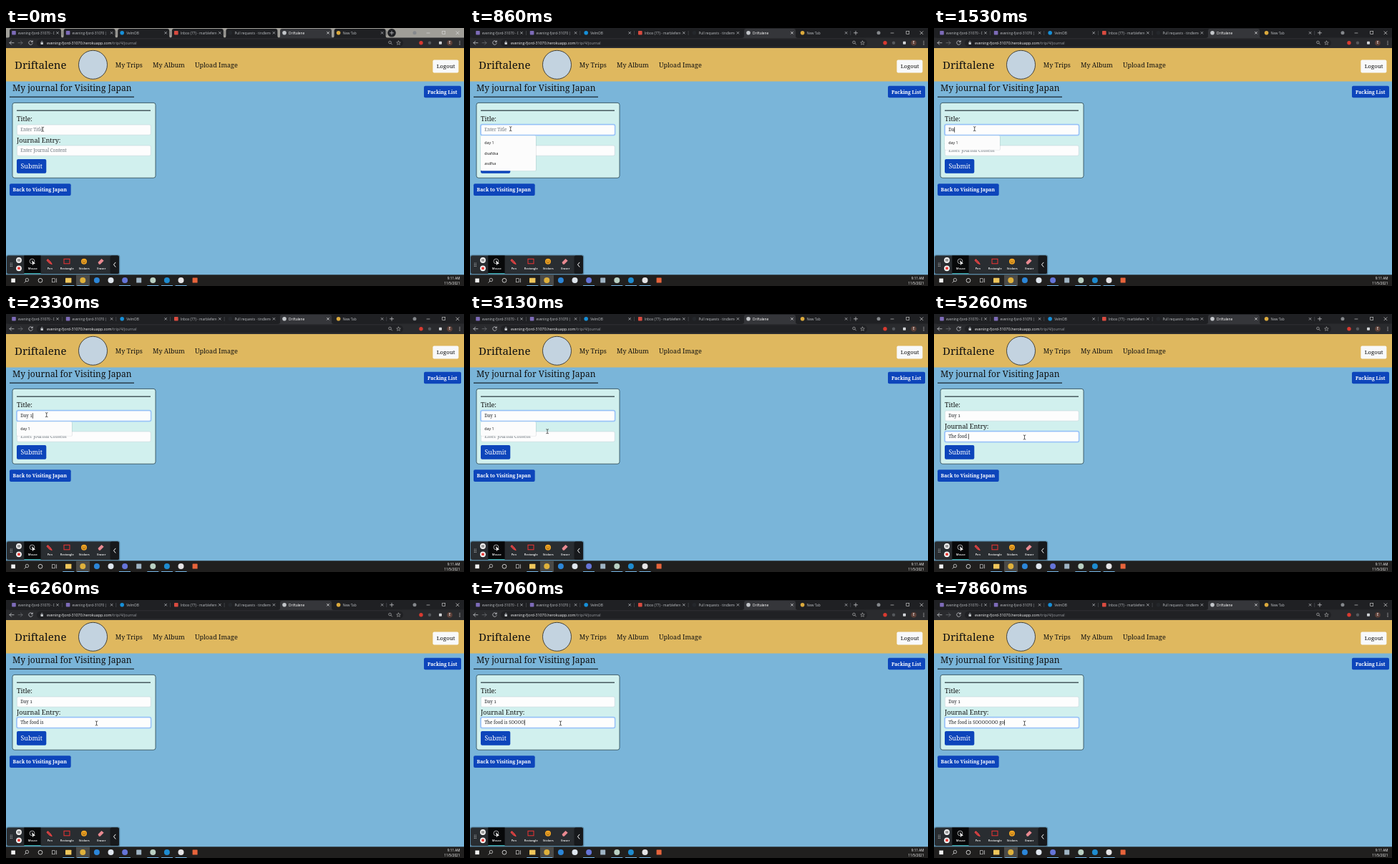
An HTML page that plays this animation: 640x360 px, repeating every 8 s.

```html
<!DOCTYPE html>
<html lang="en">
<head>
<meta charset="utf-8">
<title>Travel journal</title>
<style>
  html, body { margin: 0; width: 100%; height: 100%; overflow: hidden; background: #7ab5d9; }
  svg { display: block; width: 100vw; height: 100vh; }
  text { white-space: pre; }
  .serif { font-family: "Noto Serif", serif; font-variant-numeric: oldstyle-nums; }
  .ui { font-family: "Open Sans", "Noto Sans", sans-serif; }
  .line { fill: none; stroke-linecap: round; stroke-linejoin: round; }
</style>
</head>
<body>
<svg id="stage" viewBox="0 0 640 360"></svg>
<script>
const stage = document.getElementById('stage');
const rect = (x, y, w, h, fill, r = 0, more = '') =>
  `<rect x="${x}" y="${y}" width="${w}" height="${h}" rx="${r}" fill="${fill}" ${more}/>`;
const dot = (x, y, r, fill, more = '') => `<circle cx="${x}" cy="${y}" r="${r}" fill="${fill}" ${more}/>`;
const line = (d, color, width = 0.7, more = '') =>
  `<path class="line" d="${d}" stroke="${color}" stroke-width="${width}" ${more}/>`;
const text = (cls, x, y, size, str, fill = '#111', more = '') =>
  `<text class="${cls}" x="${x}" y="${y}" font-size="${size}" fill="${fill}" ${more}>${str}</text>`;
const serif = (...args) => text('serif', ...args);
const ui = (...args) => text('ui', ...args);
const cross = (x, y, s, color) => line(`M${x - s} ${y - s}l${2 * s} ${2 * s}m0 ${-2 * s}l${-2 * s} ${2 * s}`, color);
const tabShape = (x, fill) =>
  `<path d="M${x} 14q3 0 3-3V4q0-3 3-3h66q3 0 3 3v7q0 3 3 3z" fill="${fill}"/>`;

function browserBar() {
  const tabs = [
    ['evening-fjord-31070 - D', '#7d6bb8', 'square'], ['evening-fjord-31070 | H', '#7d6bb8', 'square'],
    ['VelmDB', '#168fd8'], ['Inbox (77) - marblefenw', '#d94b40', 'square'],
    ['Pull requests · tindlemo', '#24272b'], ['Driftalene', '#c3c6ca'], ['New Tab', '#dba93c']
  ];
  let out = rect(0, 0, 640, 14, '#1f2023', 0, 'id="strip"') + rect(0, 13.5, 640, 14.5, '#2a2b2e');
  tabs.forEach(([label, color, shape], i) => {
    const x = 11 + i * 75.6, active = i === 5;
    out += tabShape(x - 9, active ? '#35363a' : '#1f2023');
    out += shape ? rect(x - 2.8, 4, 5.6, 5.6, color, 0.8) : dot(x, 6.8, 2.8, color);
    out += `<svg x="${x + 5.5}" y="0" width="51" height="14">${ui(0.5, 8.7, 4.8, label, active ? '#fff' : '#b9bcc0')}</svg>`;
    out += cross(x + 61, 6.8, 1.4, active ? '#fff' : '#c5c8cc');
    if (i < 4 || i === 6) out += rect(x + 67, 4, 0.5, 6, '#5b5d61');
  });
  out += dot(539, 6.8, 5.8, '#1f2023') + line('M536.5 6.8h5m-2.5-2.5v5', '#d5d7da')
    + dot(571, 6.8, 2.5, '#85888c') + line('M588 7h4', '#ddd', 0.6)
    + rect(609.7, 4.5, 4, 4, 'none', 0, 'stroke="#ddd" stroke-width=".6"') + cross(631, 6.8, 2, '#ddd');
  out += line('M11 20.7H5m2.5-2.5L5 20.7l2.5 2.5', '#dadce0')
    + line('M17 20.7h6m-2.5-2.5 2.5 2.5-2.5 2.5', '#77797d')
    + line('M37 19.2a2.8 2.8 0 1 0 .2 2.3M37.2 17.7v1.8h-1.8', '#dadce0');
  out += rect(43, 15.5, 512, 10.6, '#202124', 5.3)
    + rect(48.5, 20, 3.4, 3, '#c7cacd', 0.4) + line('M49.3 20v-.8a.9.9 0 0 1 1.8 0v.8', '#c7cacd', 0.6)
    + ui(57, 22.6, 5.33, 'evening-fjord-31070.herokuapp.com<tspan fill="#9b9ea3">/trip/4/journal</tspan>', '#f0f1f2');
  out += dot(536.5, 20, 1.8, 'none', 'stroke="#ccc" stroke-width=".6"') + line('M538 21.5l1.5 1.5', '#ccc')
    + line('M548.5 18l.8 1.8 2 .2-1.5 1.3.5 2-1.8-1-1.8 1 .5-2-1.5-1.3 2-.2z', '#ccc', 0.5)
    + dot(580, 20.7, 2.7, '#d93a30') + dot(592, 20.7, 2.2, '#55585c')
    + rect(605, 18.8, 4, 4, '#d0d3d6', 0.7)
    + dot(620, 20.7, 3.8, '#5e4038') + ui(620, 22.4, 4.8, 'E', '#fff', 'text-anchor="middle"');
  return out + [18.5, 20.7, 22.9].map(y => dot(634, y, 0.6, '#ddd')).join('');
}

function page() {
  const button = (x, y, w, h) => rect(x, y, w, h, '#0d45bb', 2);
  const input = (id, y) => `<g id="${id}">`
    + rect(14, y - 1, 189.5, 16.8, '#86b7fe', 3, 'class="glow" opacity="0"')
    + rect(15.3, y + 0.3, 187, 14.2, '#fdfdfd', 2, 'class="box" stroke="#c3d3da" stroke-width=".6"')
    + serif(20.3, y + 9.1, 6.2, '') + rect(0, y + 3.5, 0.7, 7.6, '#111', 0, 'class="caret"') + '</g>';
  let out = rect(0, 28, 640, 46.5, '#dfb85f')
    + serif(12, 57, 15, 'Driftalene')
    + dot(121.5, 51.3, 20, '#c3d3e0', 'stroke="#222" stroke-width=".8"')
    + serif(152.7, 55, 9, 'My Trips') + serif(205, 55, 9, 'My Album') + serif(264, 55, 9.05, 'Upload Image')
    + rect(596.4, 44.5, 36, 18, '#f8f9fa', 2) + serif(601.7, 56.3, 7.8, 'Logout');
  out += serif(9, 87.9, 12.05, 'My journal for Visiting Japan') + rect(5, 95.6, 174, 1.2, '#16212a')
    + button(584, 80.7, 52, 16.5) + serif(589, 91.5, 6.75, 'Packing List', '#fff', 'font-weight="600"')
    + rect(9, 104.4, 200, 104.8, '#d1f0ee', 3, 'stroke="#28434d" stroke-width=".8"')
    + rect(15, 114.6, 187, 1.1, '#15232a')
    + serif(15, 130.2, 9.1, 'Title:') + serif(15, 159.8, 9.1, 'Journal Entry:')
    + input('title', 134.7) + input('entry', 163.7)
    + button(15, 183, 41.3, 19.7) + serif(20.5, 196, 8.9, 'Submit', '#fff')
    + button(5, 217.3, 85.7, 16.7) + serif(9.6, 228.3, 6.85, 'Back to Visiting Japan', '#fff', 'font-weight="600"');
  return out;
}

function toolbar() {
  const tools = ['Mouse', 'Pen', 'Rectangle', 'Stickers', 'Eraser'];
  let out = rect(0, 316.5, 159.3, 28, '#17303e', 3, 'opacity=".35"')
    + rect(1, 317.5, 157, 25.4, '#292d31', 2.5) + rect(25.3, 317.5, 23.3, 25.4, '#070809')
    + rect(25.3, 342, 23.3, 0.9, '#3bbdb8')
    + rect(145.5, 317.5, 12.5, 25.4, '#17191c', 2.5);
  for (let i = 0; i < 6; i++) out += dot(6.3 + i % 2 * 2, 328 + (i >> 1) * 2.2, 0.6, '#b7babd');
  out += dot(18, 324, 3.9, '#f5f5f5') + rect(16.5, 322.2, 0.9, 3.6, '#222') + rect(18.6, 322.2, 0.9, 3.6, '#222')
    + dot(18, 335.3, 3.9, '#f5f5f5') + rect(16.2, 333.5, 3.6, 3.6, '#e53935', 0.4);
  tools.forEach((name, i) => out += ui(37.3 + i * 24, 336.5, 4, name, '#fff', 'text-anchor="middle" font-weight="600"'));
  out += dot(36.5, 325.5, 3.4, 'none', 'stroke="#e9eaeb" stroke-width=".7"')
    + '<path d="M36 324l5 5-2.4.1-1.1 2.1z" fill="#fff"/>'
    + line('M58.5 323l4 4 1.5 2.5-2.7-1.3-4-4z', '#ef4444', 1.3)
    + rect(81, 322.3, 8, 6.5, 'none', 0, 'stroke="#ef3434" stroke-width="1"')
    + dot(109, 325.8, 4, '#f5a623') + dot(107.6, 325, 0.6, '#412b10') + dot(110.4, 325, 0.6, '#412b10')
    + line('M107 327q2 2 4 0', '#412b10', 0.6)
    + '<path d="M128.5 327l5-5 3.2 2.7-5 5h-1.8z" fill="#e98a91"/>'
    + line('M153 327.2l-2.5 3 2.5 3', '#fff', 1);
  return out;
}

function taskbar() {
  let out = rect(0, 344.3, 640, 15.7, '#201f1e') + rect(98, 344.3, 19, 15.7, '#4a4a48')
    + rect(7.3, 349.5, 5.6, 5.6, '#f2f2f2')
    + dot(29.4, 351.5, 2.2, 'none', 'stroke="#eee" stroke-width=".7"') + line('M27.8 353.2l-2 2', '#eee')
    + dot(48, 352.2, 2.9, 'none', 'stroke="#eee" stroke-width=".8"')
    + rect(64.5, 349.7, 4, 5, 'none', 0, 'stroke="#ddd" stroke-width=".6"') + line('M70.5 349.7v5', '#ddd')
    + rect(83, 348.7, 8.4, 6.8, '#efc65b', 0.5);
  const apps = ['#dfb13b', '#2c86d8', '#dfe6ee', '#6574d8', '#9fb4c4', '#b9d0c3', '#1e8cd0', '#e5e4e6', '#e7643b'];
  apps.forEach((color, i) => {
    const x = 107.3 + i * 19.6;
    out += [4, 8].includes(i) ? rect(x - 3.5, 348.5, 7, 7, color, 0.6) : dot(x, 352, 4, color);
  });
  [87.3, 107.3, 166, 205.3, 225, 244.6].forEach(x => out += rect(x - 8, 359, 16, 1, '#75b5e5'));
  return out + ui(634.5, 350.7, 4.7, '9:11 AM', '#fff', 'text-anchor="end"')
    + ui(634.5, 357.7, 4.7, '11/5/2021', '#fff', 'text-anchor="end"');
}

const menu = (id, y) => `<g id="${id}">`
  + rect(14.6, y, 78, 49, '#345', 1.5, 'class="panel" opacity=".18"')
  + rect(15, y - 0.3, 77, 49, '#fcfcfc', 1.5, 'class="panel"')
  + [0, 1, 2].map(i => ui(20.2, y + 11.7 + i * 14.5, 5.3, '')).join('') + '</g>';

stage.innerHTML = page() + menu('titleMenu', 150.5) + menu('entryMenu', 179.8)
  + browserBar() + toolbar() + taskbar()
  + `<g id="pointer">${line('M-1.4-3q1.4 0 1.4.8q0-.8 1.4-.8M0-2.2v4.4M-1.4 3q1.4 0 1.4-.8q0 .8 1.4.8', '#222', 0.7)}</g>`;

const CLICK = { title: 330, entry: 3460 };
const KEYS = {
  title: { string: 'Day 1', times: [1330, 1530, 1730, 1860, 2200] },
  entry: {
    string: 'The food is SOOOOOOO go',
    times: [4130, 4260, 4330, 4460, 4600, 4730, 4800, 5060, 5260, 5600, 5730, 6330,
            6600, 6730, 6860, 6960, 7060, 7160, 7260, 7360, 7400, 7460, 7830]
  }
};
const clamp = v => Math.max(0, Math.min(1, v));
const ramp = (t, start, length) => clamp((t - start) / length);
const ease = v => v * v * (3 - 2 * v);

function drawInput(id, t, placeholder, blurTime) {
  const group = document.getElementById(id);
  const { string, times } = KEYS[id];
  const count = times.filter(k => k <= t).length;
  const label = group.querySelector('text');
  label.textContent = count ? string.slice(0, count) : placeholder;
  label.setAttribute('fill', count ? '#212529' : '#6c757d');

  const focused = t >= CLICK[id] && t < blurTime;
  const focus = ramp(t, CLICK[id], 130) * (1 - ramp(t, blurTime, 130));
  group.querySelector('.glow').setAttribute('opacity', focus * 0.65);
  group.querySelector('.box').setAttribute('stroke', focus > 0.5 ? '#74a9f5' : '#c3d3da');

  const lastKey = count ? times[count - 1] : CLICK[id];
  const caret = group.querySelector('.caret');
  const blinkOn = Math.floor((t - lastKey) / 530) % 2 === 0;
  caret.setAttribute('opacity', focused && blinkOn ? 1 : 0);
  caret.setAttribute('x', 20.4 + (count ? label.getComputedTextLength() : 0));
}

function drawMenu(id, items, opacity) {
  const group = document.getElementById(id);
  group.setAttribute('opacity', opacity);
  group.querySelectorAll('.panel').forEach(p => p.setAttribute('height', 5.5 + items.length * 14.5));
  group.querySelectorAll('text').forEach((el, i) => el.textContent = items[i] || '');
}

function draw(t) {
  // The window frame is still light when the clip starts.
  document.getElementById('strip').setAttribute('fill', t < 60 ? '#a09e98' : '#1f2023');
  drawInput('title', t, 'Enter Title', CLICK.entry);
  drawInput('entry', t, 'Enter Journal Content', Infinity);
  const titleItems = ['day 1', 'dsafdsa', 'asdfsa'].slice(0, t < 1330 ? 3 : t < 1530 ? 2 : 1);
  drawMenu('titleMenu', titleItems, ramp(t, 400, 130) * (1 - ramp(t, 3400, 130)));
  drawMenu('entryMenu', ['good', 'asdfsaf', 'asdfdsa'], ramp(t, 3460, 70) * (1 - ramp(t, 4130, 130)));
  const near = ease(ramp(t, 60, 240)), far = ease(ramp(t, 2600, 800));
  const x = 51.3 + 5.4 * near + 69.8 * far;
  const y = 141.3 - 0.6 * near + 31.3 * far;
  document.getElementById('pointer').setAttribute('transform', `translate(${x} ${y})`);
}

function tick() {
  draw(performance.now() % 8000);
  requestAnimationFrame(tick);
}
tick();
</script>
</body>
</html>
```
